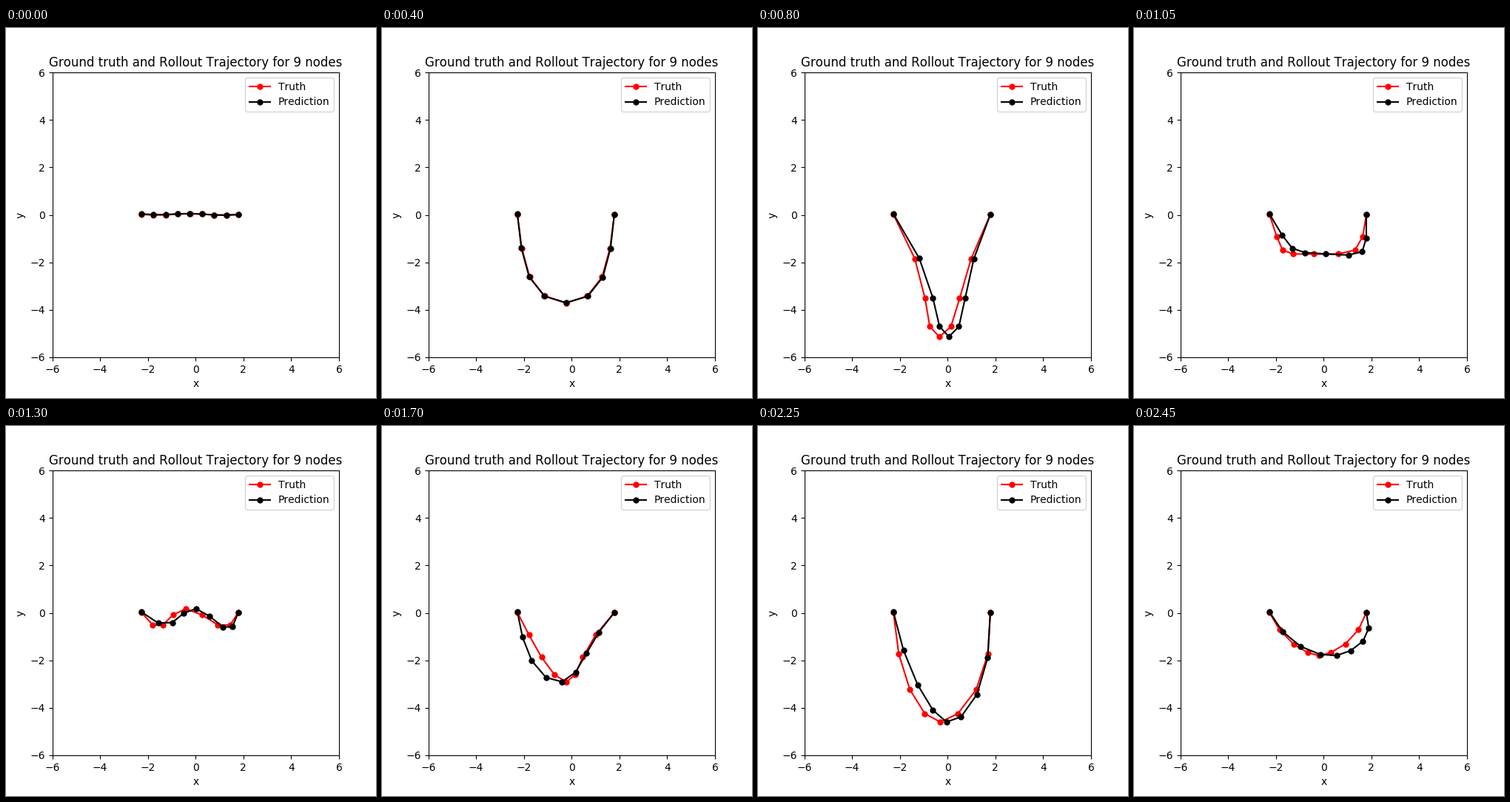
A matplotlib script that plays this animation: 500 px wide and 500 px high, repeating every 2.5 s.

```python
import numpy as np
import matplotlib.pyplot as plt
from matplotlib.animation import FuncAnimation

FRAMES, INTERVAL = 50, 50
SEGMENTS = 8
BEATS = (0, 8, 16, 26, 34, 41, 49)
PINCH_BEATS = (0, 8, 16, 21, 26, 34, 41, 49)

along = np.linspace(0, 1, SEGMENTS + 1)
clock = np.arange(FRAMES)


def ease(values, times=BEATS):
    """Smooth cubic curve through key values, starting at rest."""
    t, v = np.array(times, float), np.array(values, float)
    slope = np.gradient(v, t, edge_order=2)
    slope[0] = 0
    k = np.clip(np.searchsorted(t, clock, side="right") - 1, 0, len(t) - 2)
    h = t[k + 1] - t[k]
    u = (clock - t[k]) / h
    return ((1 + 2 * u) * (1 - u) ** 2 * v[k]
            + u * (1 - u) ** 2 * h * slope[k]
            + u * u * (3 - 2 * u) * v[k + 1]
            + u * u * (u - 1) * h * slope[k + 1])


def mode(order, amplitude):
    """Standing wave of a string pinned at both ends."""
    return np.outer(amplitude, np.sin(order * np.pi * along))


# Both chains fall, stretch and rebound together.
depth = ease((0, 1, 3.73, 5.75, 5.08, 1.9, .3, 1.15, 2.8, 5.55, 1.85),
             (0, 4, 8, 12.5, 16, 21, 26, 30, 34, 41, 49))
ripple = ease((.03, 0, -.08, .45, -.13, -.05, .03))
skew = ease((0, 0, .065, .1, -.12, .05, .02))
flutter = ease((0, .03, .14, 0, .02, -.06, -.08))


def chain(left, right, sway, pinch, tilt):
    """Node positions of one chain for every time step."""
    rest_x, rest_y = (a + (b - a) * along for a, b in zip(left, right))
    x = (rest_x + mode(1, ease(sway)) + mode(2, ease(pinch, PINCH_BEATS))
         + mode(3, skew) + mode(4, flutter))
    y = rest_y - mode(1, depth) - mode(2, ease(tilt)) - mode(3, ripple)
    return x, y


truth = chain((-2.27, .02), (1.79, .02),
              sway=(0, 0, -.04, -.07, -.1, -.05, .07),
              pinch=(0, -.5, .29, -.5, -.14, .15, -.41, -.07),
              tilt=(0, 0, 0, 0, 0, 0, 0))
prediction = chain((-2.27, .04), (1.785, .01),
                   sway=(0, .01, .36, .36, -.28, -.1, .81),
                   pinch=(0, -.53, .34, -.45, -.05, -.13, -.18, -.29),
                   tilt=(0, 0, 0, -.09, .16, -.27, .12))

plt.rcParams["text.kerning_factor"] = 6  # whole-pixel letter spacing
fig, ax = plt.subplots(figsize=(5, 5), dpi=100)
lines = [ax.plot([], [], "o-", color=color, markersize=5, label=label)[0]
         for color, label in (("red", "Truth"), ("black", "Prediction"))]
ax.set(xlim=(-6, 6), ylim=(-6, 6), xlabel="x", ylabel="y",
       xticks=range(-6, 7, 2), yticks=range(-6, 7, 2),
       title="Ground truth and Rollout Trajectory for 9 nodes")
ax.legend(loc="upper right")


def update(n):
    for line, (x, y) in zip(lines, (truth, prediction)):
        line.set_data(x[n], y[n])
    return lines


anim = FuncAnimation(fig, update, frames=FRAMES, interval=INTERVAL,
                     repeat=True, repeat_delay=0)
plt.show()
```
